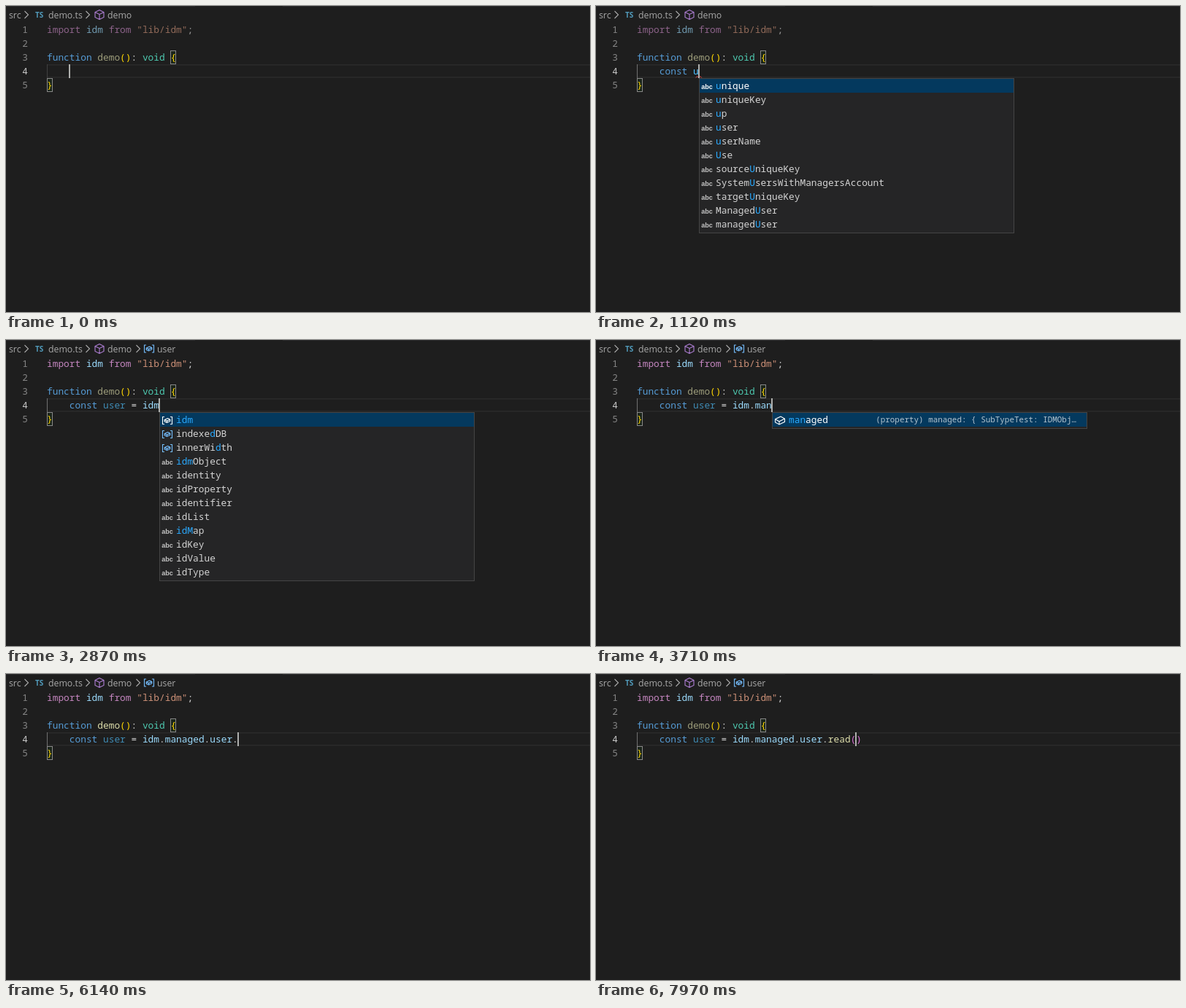
An HTML page with a canvas that plays this animation: 800 px wide and 420 px high, repeating every 8000 ms.

```html
<!DOCTYPE html>
<html lang="en">
<head>
<meta charset="utf-8">
<title>Editor completion</title>
<style>
html, body { margin: 0; width: 100%; height: 100%; overflow: hidden; background: #1e1e1e; }
canvas { display: block; }
</style>
</head>
<body>
<canvas id="stage" width="800" height="420"></canvas>
<script>
const ctx = document.getElementById('stage').getContext('2d');
const LOOP = 8000, LEFT = 56, LINE = 19, CHAR = 7.7, INDENT = 4;
const CODE = '12.83px "Noto Sans Mono", monospace';
const DETAIL = '10.91px "Noto Sans Mono", monospace';
const UI = '12.3px "Open Sans", sans-serif';
const C = {
  bg: '#1e1e1e', text: '#d4d4d4', keyword: '#569cd6', flow: '#c586c0', name: '#9cdcfe',
  constant: '#4fc1ff', string: '#ce9178', func: '#dcdcaa', type: '#4ec9b0', gold: '#ffd700',
  orchid: '#da70d6', error: '#f14c4c', method: '#b180d7', field: '#75beff', crumb: '#a9a9a9'
};

// Completion lists: kind letter and label; *stars* mark matches inside a word.
const list = s => s.split('|').map(row => ({ kind: row[0], label: row.slice(2) }));
const words = {
  c: list('k const|k case|k catch|k class|k continue|v console|m clearInterval|m clearTimeout|m confirm|v caches|v crypto|m close'),
  con: list('k const|k continue|v console|m confirm|f constructor|a connector|a condition|a config|a context|a content|a connection|a contains'),
  u: list('a unique|a uniqueKey|a up|a user|a userName|a Use|a source*U*niqueKey|a System*U*sersWithManagersAccount|a target*U*niqueKey|a Managed*U*ser|a managed*U*ser'),
  user: list('a user|a userName|a System*User*sWithManagersAccount|a Managed*User*|a managed*User*'),
  i: list('v idm|k if|k import|k in|k instanceof|k interface|v indexedDB|v innerHeight|v innerWidth|m isFinite|m isNaN|v Infinity'),
  id: list('v idm|v indexe*d*DB|v innerWi*d*th|a idmObject|a identity|a idProperty|a identifier|a idList|a idMap|a idKey|a idValue|a idType'),
  idm: list('f managed|f system|f config|f internal|f repo|m action|m create|m delete|m patch|m query|m read|m update'),
  ma: list('f managed|f syste*m*'),
  man: list('f managed'),
  managed: list('f SubTypeTest|f user|f role|f assignment|f organization'),
  use: list('f user|f *S*ubTyp*e*Test'),
  members: list('m action|m create|m delete|m patch|m query|m read|m relationship|m update'),
  r: list('m read|m relationship|m c*r*eate|m que*r*y'),
  re: list('m read|m relationship|m c*re*ate|m que*r*y'),
  rea: list('m read|m *re*l*a*tionship|m create')
};
const details = {
  managed: '(property) managed: { SubTypeTest: IDMObj…',
  user: '(property) user: IDMObject<ManagedUser, M…',
  read: '(method) IDMObject<ManagedUser, ManagedUs…'
};

// [start ms, typed text, completion list]
const U = 'const user = ';
const steps = [
  [0, ''], [70, 'c'], [140, 'c', 'c'], [280, 'co', 'c'], [420, 'con', 'con'], [560, 'cons', 'con'],
  [770, 'const', 'con'], [840, 'const '],
  [1050, 'const u'], [1120, 'const u', 'u'], [1190, 'const use', 'user'], [1260, 'const user', 'user'],
  [1470, 'const user '], [1830, 'const user ='], [1970, U],
  [2310, U + 'i'], [2380, U + 'i', 'i'], [2520, U + 'id', 'id'], [2660, U + 'idm', 'id'],
  [3010, U + 'idm.'], [3080, U + 'idm.', 'idm'], [3430, U + 'idm.m', 'ma'], [3570, U + 'idm.ma', 'ma'],
  [3710, U + 'idm.man', 'man'], [4120, U + 'idm.managed'],
  [4600, U + 'idm.managed.'], [4740, U + 'idm.managed.', 'managed'],
  [4950, U + 'idm.managed.u', 'use'], [5020, U + 'idm.managed.us', 'use'],
  [5090, U + 'idm.managed.use', 'use'], [5160, U + 'idm.managed.user', 'use'], [5300, U + 'idm.managed.user'],
  [6140, U + 'idm.managed.user.'], [6210, U + 'idm.managed.user.', 'members'],
  [6700, U + 'idm.managed.user.r', 'r'], [6840, U + 'idm.managed.user.re', 're'],
  [6910, U + 'idm.managed.user.rea', 'rea'], [7330, U + 'idm.managed.user.read'],
  [7600, U + 'idm.managed.user.read()']
];

const during = (t, ...spans) => spans.some(([a, b]) => t >= a && t < b);
const colX = col => LEFT + col * CHAR;
const lineTop = n => 4 + n * LINE;

function text(s, x, y, color, font = CODE, alpha = 1) {
  ctx.font = font;
  ctx.fillStyle = color;
  ctx.globalAlpha = alpha;
  ctx.fillText(s, x, y);
  ctx.globalAlpha = 1;
}

function rect(x, y, w, h, color) {
  ctx.fillStyle = color;
  ctx.fillRect(x, y, w, h);
}

function stroke(color, width, ...paths) {
  ctx.strokeStyle = color;
  ctx.lineWidth = width;
  ctx.beginPath();
  for (const path of paths) path.forEach(([x, y], i) => i ? ctx.lineTo(x, y) : ctx.moveTo(x, y));
  ctx.stroke();
}

// Draws [string, color, alpha] tokens on the character grid.
function codeLine(n, tokens, col = 0) {
  for (const [s, color, alpha] of tokens) {
    text(s, colX(col), lineTop(n) + 14, color, CODE, alpha);
    col += s.length;
  }
}

function squiggle(x, y, width) {
  const points = [];
  for (let i = 0; i <= width; i += 2) points.push([x + i, y + (i / 2 % 2 ? 0.5 : 2.5)]);
  stroke(C.error, 1, points);
}

function at(x, y, draw) {
  ctx.save();
  ctx.translate(x, y);
  draw();
  ctx.restore();
}

const icons = {
  m: (x, y, color = C.method) => at(x, y, () => stroke(color, 1.1,
    [[0, -6.5], [6, -3.5], [6, 3.5], [0, 6.5], [-6, 3.5], [-6, -3.5], [0, -6.5]],
    [[-6, -3.5], [0, -0.5], [6, -3.5]], [[0, -0.5], [0, 6.5]])),
  f: (x, y, color = C.field) => at(x, y, () => stroke(color, 1.1,
    [[1, -5.5], [6.5, -2.5], [6.5, 1.8], [-1, 5.5], [-6.5, 2.5], [-6.5, -1.8], [1, -5.5]],
    [[-6.5, -1.8], [-1, 1.3], [6.5, -2.5]], [[-1, 1.3], [-1, 5.5]])),
  v: (x, y, color = C.field) => at(x, y, () => stroke(color, 1.1,
    [[-4, -5], [-6.5, -5], [-6.5, 5], [-4, 5]], [[4, -5], [6.5, -5], [6.5, 5], [4, 5]],
    [[0.5, -3], [3.8, -1.3], [3.8, 1], [-0.5, 3], [-3.8, 1.3], [-3.8, -1], [0.5, -3]],
    [[-3.8, -1], [-0.5, 0.6], [3.8, -1.3]], [[-0.5, 0.6], [-0.5, 3]])),
  a: (x, y, color = '#c5c5c5') =>
    text('abc', x - 7.7, y + 3.5, color, 'bold 9px "Liberation Sans", sans-serif'),
  k: (x, y, color = '#c5c5c5') => at(x, y, () => stroke(color, 1.1,
    [[-6, -4], [6, -4]], [[-6, -1], [1, -1]], [[3, -1], [6, -1]], [[-6, 2], [-2, 2]], [[0, 2], [6, 2]], [[-6, 5], [3, 5]]))
};

function chevron(x) {
  stroke(C.crumb, 1.1, [[x - 2.5, 7], [x + 2.5, 12], [x - 2.5, 17]]);
}

function breadcrumbs(t) {
  text('src', 4, 17, C.crumb, UI);
  chevron(28);
  text('TS', 40, 16, '#519aba', 'bold 10px "Open Sans", sans-serif');
  text('demo.ts', 58, 17, C.crumb, UI);
  chevron(112);
  icons.m(128, 12);
  text('demo', 139, 17, C.crumb, UI);
  if (t >= 2870) {
    chevron(181);
    icons.v(196, 12);
    text('user', 207, 17, C.crumb, UI);
  }
}

function bracketBox(col, n) {
  const x = Math.round(colX(col)), y = lineTop(n);
  rect(x, y, 8, LINE, 'rgba(0,100,0,0.1)');
  ctx.strokeStyle = '#888';
  ctx.lineWidth = 1;
  ctx.strokeRect(x + 0.5, y + 0.5, 7, LINE - 1);
}

function statement(typed, dimUser) {
  const [, first, gap, variable, equals, rest] = typed.match(/^(\w*)(\s*)(\w*)([ =]*)(.*)$/);
  const tokens = [
    [first, first === 'const' ? C.keyword : C.name], [gap, C.text],
    [variable, C.constant, dimUser], [equals, C.text]
  ];
  for (const part of rest.match(/\w+|\W/g) || []) {
    const color = part === '.' ? C.text : /[()]/.test(part) ? C.orchid : part === 'read' ? C.func : C.name;
    tokens.push([part, color]);
  }
  return tokens;
}

function label(word, prefix, x, y, selected) {
  const starts = prefix && word.toLowerCase().startsWith(prefix.toLowerCase());
  const parts = starts ? ['', word.slice(0, prefix.length), word.slice(prefix.length)] : word.split('*');
  let col = 0;
  parts.forEach((part, i) => {
    text(part, x + col * CHAR, y, i % 2 ? '#2aaaff' : selected ? '#fff' : C.text);
    col += part.length;
  });
}

function popup(rows, typed) {
  const x = Math.round(colX(INDENT + typed.length)), y = 99, height = rows.length * LINE + 4;
  const prefix = typed.match(/\w*$/)[0];
  rect(x, y, 432, height, '#454545');
  rect(x + 1, y + 1, 430, height - 2, '#252526');
  rect(x + 1, y + 1, 430, LINE, '#04395e');
  rows.forEach(({ kind, label: word }, i) => {
    const top = y + 1 + i * LINE;
    icons[kind](x + 11, top + 10.5, i ? undefined : '#fff');
    label(word, prefix, x + 23, top + 14, !i);
  });
  const detail = details[rows[0].label];
  if (detail) {
    ctx.textAlign = 'right';
    text(detail, x + 417, y + 14, '#fff', DETAIL, 0.7);
    ctx.textAlign = 'left';
  }
}

function draw(t) {
  const [, typed, rows] = steps.findLast(step => step[0] <= t);
  const broken = during(t, [2030, 2800], [5020, 5300], [6420, 7540]);
  const fade = on => on ? 0.667 : 1;
  const importFade = fade(t < 2800);
  const demoFade = fade(!during(t, [1970, 2800], [5230, 6210]));

  rect(0, 0, 800, 420, C.bg);
  const gapEnd = during(t, [1970, 2800]) ? 389 : 379;
  rect(0, 0, 259, 1, '#2a2a2b');
  rect(gapEnd, 0, 800 - gapEnd, 1, '#2a2a2b');
  breadcrumbs(t);

  const top = lineTop(4);
  rect(LEFT, top, 744, 1.5, '#2a2a2a');
  rect(LEFT, top + LINE - 2, 744, 1.5, '#2a2a2a');
  rect(LEFT, top, 1, LINE, t < 70 ? '#404040' : '#707070');
  for (let n = 1; n <= 5; n++) text(n, 22.3, lineTop(n) + 14, n === 4 ? '#c6c6c6' : '#858585');

  bracketBox(22, 3);
  bracketBox(0, 5);
  codeLine(1, [
    ['import ', C.flow, importFade], ['idm ', C.name, importFade], ['from ', C.flow, importFade],
    ['"lib/idm"', C.string, importFade], [';', C.text, importFade]
  ]);
  codeLine(3, [
    ['function ', C.keyword], ['demo', C.func, demoFade], ['()', C.gold], [': ', C.text],
    ['void ', C.type], ['{', C.gold]
  ]);
  codeLine(4, statement(typed, fade(t >= 2870)), INDENT);
  codeLine(5, [['}', C.gold]]);

  if (broken) squiggle(LEFT, lineTop(5) + 16, 8);
  const caretCol = INDENT + typed.length - (typed.endsWith(')') ? 1 : 0);
  if (during(t, [1050, 1260])) squiggle(colX(caretCol) - 4, top + 16, 8);
  if (during(t, [4120, 4460])) squiggle(colX(21), top + 16, 23);
  if (!during(t, [5440, 5930], [7830, 7970])) {
    rect(Math.round(colX(caretCol)) - 1, top, 2, LINE, '#aeafad');
  }
  if (rows) popup(words[rows], typed);
}

const start = performance.now();
function tick() {
  draw((performance.now() - start) % LOOP);
  requestAnimationFrame(tick);
}
tick();
</script>
</body>
</html>
```
